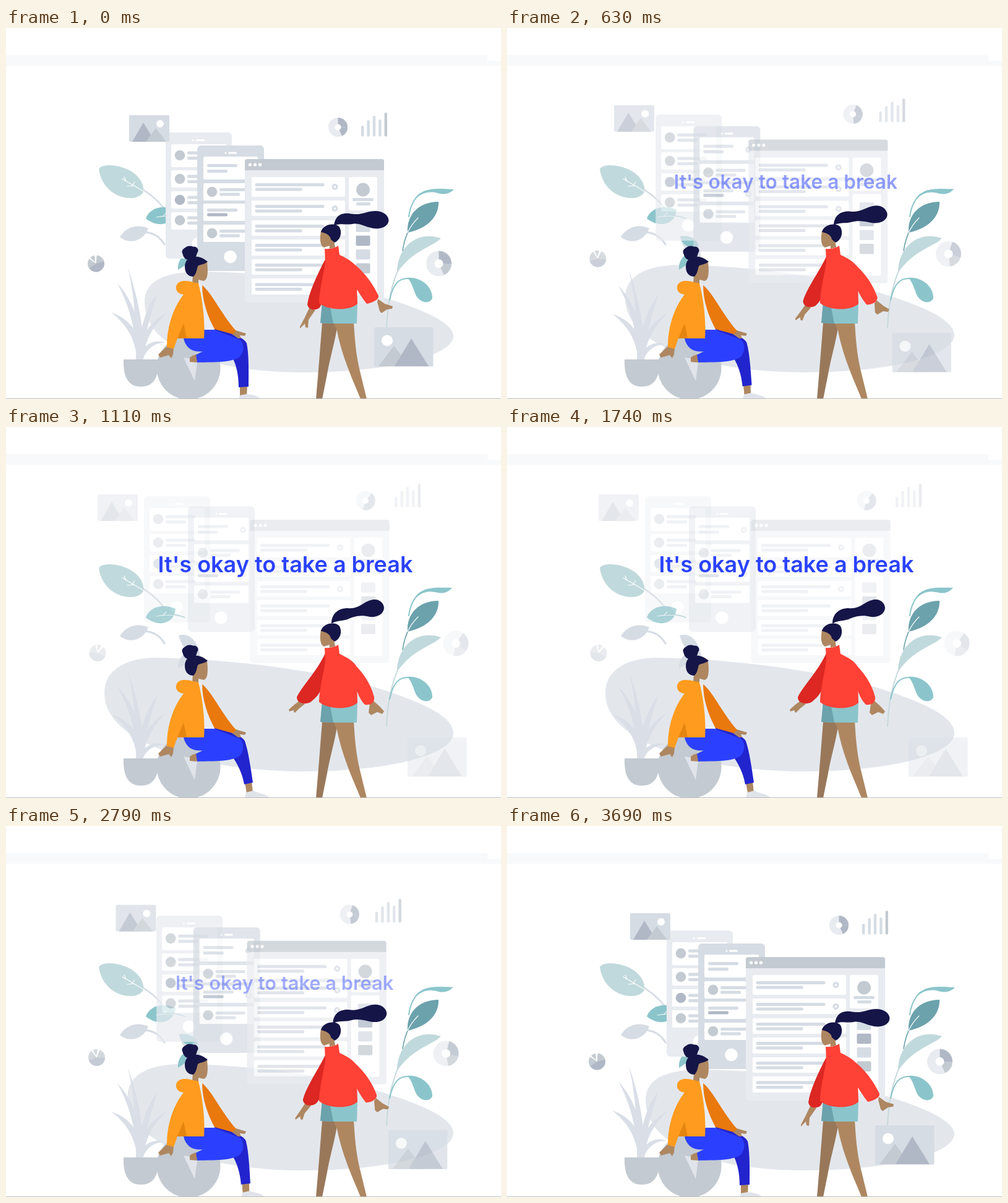
Animation of 800x600 px, one loop 3720 ms. Source, as an HTML page:

```html
<!DOCTYPE html>
<html lang="en">
<head>
<meta charset="utf-8">
<style>
html, body { margin: 0; width: 100%; height: 100%; overflow: hidden; background: #fff; }
svg { display: block; }
text { font: 600 36px Inter, sans-serif; fill: #2a42fc; text-anchor: middle; }
.line { fill: none; stroke-linecap: round; }
</style>
</head>
<body>
<svg id="stage" width="800" height="600" viewBox="0 0 800 600"></svg>
<script>
const PALE = '#e8ebf0', SOFT = '#d6dce4', MID = '#c3cad1', DARK = '#b0b8c6', WHITE = '#fff';
const TEAL = '#8bc5cb', DEEP_TEAL = '#6ba2ac', MIST = '#c0d9dc', NAVY = '#151548';
const SKIN = '#ae8761', SKIN_SHADE = '#99785a', SHOE = '#e0e4ea';

const rect = (x, y, w, h, fill, r = 0) =>
  `<rect x="${x}" y="${y}" width="${w}" height="${h}" rx="${r}" fill="${fill}"/>`;
const dot = (x, y, r, fill) => `<circle cx="${x}" cy="${y}" r="${r}" fill="${fill}"/>`;
const bar = (x, y, w, fill = SOFT) => rect(x, y, w, 5, fill, 2);
const shape = (d, fill) => `<path d="${d}" fill="${fill}"/>`;
const line = (d, stroke, w) => `<path class="line" d="${d}" stroke="${stroke}" stroke-width="${w}"/>`;
const ring = (x, y) => dot(x, y, 5, SOFT) + dot(x, y, 1.8, WHITE);

// A shape with a working pose and a resting pose
const morph = (from, to, fill) => `<path data-from="${from}" data-to="${to}" fill="${fill}"/>`;

// A card that drifts by (dx, dy), optionally turning about its centre
const card = (dx, dy, body, cx = 0, cy = 0, turn = 0) =>
  `<g class="card" data-move="${dx},${dy},${turn},${cx},${cy}">${body}</g>`;

function wedge(cx, cy, r, from, to, fill) {
  const at = deg => {
    const a = (deg - 90) * Math.PI / 180;
    return `${(cx + r * Math.cos(a)).toFixed(2)} ${(cy + r * Math.sin(a)).toFixed(2)}`;
  };
  return shape(`M${cx} ${cy}L${at(from)}A${r} ${r} 0 ${to - from > 180 ? 1 : 0} 1 ${at(to)}Z`, fill);
}

const donut = (cx, cy, r, hole) => dot(cx, cy, r, PALE) + wedge(cx, cy, r, 0, 90, DARK) +
  wedge(cx, cy, r, 90, 155, r > 18 ? MID : DARK) + dot(cx, cy, hole, WHITE);

function phoneBack() {
  let s = rect(258, 169, 107, 204, PALE, 6) + dot(302, 181.5, 1.5, WHITE) + rect(307, 180, 14, 3, WHITE, 1.5);
  [[188, 37, 206], [230, 28, 244], [264, 28, 278], [298, 28, 311]].forEach(([y, h, c], i) => {
    s += rect(267, y, 89, h, WHITE, 2) + dot(281, c, 8.3, i === 2 ? DARK : MID) +
      bar(293, c - 6.5, 48) + bar(293, c + 2, 33);
  });
  return s + dot(310.5, 348.5, 10, WHITE);
}

function phoneFront() {
  let s = rect(309, 190, 108, 203, SOFT, 6) + dot(355, 202, 1.5, WHITE) + rect(359, 200.5, 14, 3, WHITE, 1.5);
  s += rect(319, 208, 88, 37, WHITE, 2) + bar(325, 220, 49) + bar(325, 229, 33) + ring(398, 228);
  s += rect(319, 284, 88, 28, WHITE, 2) + bar(325, 292, 49) + bar(325, 299.5, 33, DARK) + ring(398, 300);
  for (const y of [265, 332])
    s += rect(319, y - 14, 88, 28, WHITE, 2) + dot(333, y, 8.3, MID) + bar(345, y - 6, 48) + bar(345, y + 1.5, 33);
  return s + dot(362.5, 370, 10.3, WHITE);
}

function browser() {
  let s = rect(386, 212, 225, 232, PALE, 4) +
    shape('M386 230V216Q386 212 390 212H607Q611 212 611 216V230Z', MID);
  for (const x of [394.5, 402.5, 410.5]) s += dot(x, 221, 2.6, WHITE);
  [[241, 32, 251], [279, 25, 286], [311, 25, 318], [342, 26, 349], [374, 25, 381], [405, 26, 412.5]]
    .forEach(([y, h, t], i) => {
      s += rect(397, y, 151, h, WHITE, 2) + bar(402.5, t, 112) + bar(402.5, t + 7.5, 76);
      if (i < 3) s += ring(531.5, t + 6);
    });
  s += rect(554, 241, 46, 54, WHITE, 3) + dot(577, 261.5, 11, MID) + bar(560, 275, 34) + bar(566, 282, 23);
  s += rect(554, 300, 46, 132, WHITE, 3);
  [SOFT, DARK, SOFT, MID].forEach((fill, i) => s += rect(565.5, 313.5 + 22.3 * i, 23, 16.5, fill, 2));
  return s;
}

const smallPicture = rect(199, 141, 65, 43, SOFT, 2) + dot(249, 155, 6, WHITE) +
  shape('M204 184L222 153L241 184Z', DARK) + shape('M226 184L242 162L259 184Z', MID);
const bigPicture = rect(595, 484, 95.5, 63.5, SOFT, 2) + dot(616, 505.5, 9, WHITE) +
  shape('M602 547L627 514L652 547Z', MID) + shape('M628 547L655 502L683 547Z', DARK);
const columns = [[574, 158], [583.4, 149], [592.8, 142], [602.2, 148], [611.6, 137]]
  .map(([x, y], i) => rect(x, y, 4.4, 175.5 - y, i === 4 ? MID : SOFT, 2)).join('');
const smallPie = dot(145.5, 381, 13.5, MID) + wedge(145.5, 381, 13.5, 75, 235, DARK) +
  wedge(145.5, 381, 14, 305, 365, WHITE) + wedge(144, 378.5, 10.5, 312, 355, MID);

const backdrop = rect(0, 44, 778, 9, '#f8f9fb') + rect(0, 53, 800, 8, '#f8f9fb') +
  morph('M224 443C224 405 265 393 320 394C430 396 520 408 600 433C680 456 723 478 723 498C723 530 620 557 480 557C340 557 224 520 224 443Z',
    'M159 430C159 395 190 373 245 373C370 376 510 394 600 422C680 447 723 470 723 495C723 530 620 557 480 557C340 557 159 520 159 430Z', '#e3e7ec');

const leftPlant = line('M205 252Q240 270 257 294', SOFT, 2.6) +
  shape('M150 228C158 214 222 224 222.5 264C214 285 157 278 150 228Z', MIST) +
  line('M188 244L222 264M194 248L191 241M204 254L208 249M206 255L196 256', WHITE, 1.2) +
  line('M262 304Q278 303 289 308', '#a9ced2', 1.8) +
  shape('M226 308C232 290 255 285 274 294C272 319 245 324 226 308Z', TEAL) +
  line('M243 306Q258 303 273 305M254 304L259 299', '#e8f3f4', 1.1) +
  line('M212 331Q242 326 256 350', SOFT, 3) +
  shape('M184 338C195 320 215 317 230 324C222 345 200 351 184 338Z', SOFT) +
  shape('M279 337C296 332 311 346 314 372C300 372 285 360 279 337ZM278 391C277 378 284 368 292 366V382Z', SOFT) +
  `<g id="bud">${shape('M280 337C295 335 307 340 310 353C295 357 283 352 280 337ZM278 391C277 378 284 368 292 366V382Z', TEAL)}</g>`;

const rightPlant = line('M615 484C617 440 624 415 634 390', '#c6d9dc', 2) +
  line('M620 440C626 412 636 404 652 405', TEAL, 2) +
  line('M651 305C653 290 658 278 668 269', TEAL, 2) +
  morph('M660 278C672 256 698 260 724 261C714 271 704 269 694 266C680 264 670 268 660 278Z',
    'M660 279C670 257 695 260 721 260C711 271 702 269 693 267C679 264 669 269 660 279Z', TEAL) +
  line('M641 360Q644 340 652 325', DEEP_TEAL, 1.6) +
  shape('M699 281C700 304 682 324 649 331C647 302 667 281 699 281Z', DEEP_TEAL) +
  line('M666 307Q655 318 649 331', WHITE, 1.1) +
  shape('M703 340C692 353 658 358 632 396C632 353 665 327 703 340Z', MIST) +
  shape('M648 404C668 401 690 417 689 437C685 447 670 445 663 433C658 423 656 410 648 404Z', TEAL);

const pot = [
  ['M210 536C211 480 207 430 197 388C210 425 224 480 222 536Z', 'M210 536C211 480 207 435 197 395C209 430 224 480 222 536Z'],
  ['M211 536C210 490 200 450 180 413C205 440 220 480 220 536Z', 'M211 536C210 490 200 455 180 420C204 445 220 480 220 536Z'],
  ['M212 536C208 500 195 480 170 460C200 470 220 495 221 536Z', 'M212 536C208 503 195 484 171 465C200 474 220 498 221 536Z'],
  ['M213 536C214 495 224 455 244 430C234 465 222 500 222 536Z', 'M213 536C214 497 224 460 244 435C234 468 222 502 222 536Z'],
  ['M214 536C217 495 232 475 262 460C238 480 224 505 222 536Z', 'M214 536C217 500 232 478 258 463C238 483 224 507 222 536Z'],
  ['M215 536C220 512 238 502 258 509C240 509 228 518 221 536Z', 'M215 536C220 516 238 508 256 514C240 514 228 521 221 536Z'],
].map(([a, b]) => morph(a, b, '#d9dee7')).join('') +
  dot(295, 549.5, 51.5, MID) + shape('M190 536H246C248 568 236 580 218 580C200 580 189 568 190 536Z', MID);

const sitting =
  shape('M287 533L300 535L309 541L305 571Z', SHOE) +
  morph('M378 578L390 578L389 595L378 595Z', 'M386 575L397 574L399 591L389 592Z', SKIN) +
  morph('M376 600L378 594L389 592C398 593 408 595 412 600Z', 'M386 600L388 591L400 588C408 593 422 593 426 600Z', SHOE) +
  morph('M336 486C360 491 385 500 389 510C393 530 392 560 392 580L376 581C376 560 372 545 366 533Z',
    'M336 486C360 492 382 499 386 508C392 525 396 555 399 575L385 578C382 560 374 545 366 533Z', '#2224ce') +
  shape('M287 502H320V488H336L378 504C386 511 385 526 376 533C360 542 330 540 309 541L306 529L318 523C300 525 290 516 287 502Z', '#2b40ff') +
  shape('M301 530L307 528L309 541L297 540L297 533Z', SKIN) +
  shape('M260 515L271 518L270 528L267 534L263 529L249 533L246 528Z', SKIN) +
  shape('M368 488L388 494L386 498L378 497L380 502L375 502L365 495Z', SKIN) +
  shape('M309 411L318 416C324 445 332 470 337 488H319C322 470 318 440 309 411Z', '#e9ecf1') +
  shape('M317 416C334 430 346 460 372 490L366 495L337 487C325 465 317 440 317 416Z', '#e9780d') +
  shape('M303 384L325 379C327 395 326 409 319 409L311 407L311 413H301Z', SKIN) +
  shape('M275 418C277 407 292 408 302 411L311 413C318 440 322 475 320 502H277L271 519L260 516C260 480 272 450 287 431C278 430 274 425 275 418Z', '#ff9b1e') +
  shape('M277 502L287 478L292 502Z', '#e4850f') +
  shape('M289 386C289 369 309 363 326 378C320 383 314 382 310 385C308 391 308 397 303 402C294 402 289 396 289 386Z', NAVY) +
  dot(297, 364, 11.5, NAVY) + dot(291, 362, 6.5, NAVY) + dot(304, 360, 6.5, NAVY);

const standing =
  morph('M490 453L500 456L489 472L488 485L484 484L483 478L475 486L475 483L482 470Z',
    'M474 443L483 448L474 455L467 462L465 461L465 458L458 460L457 457L466 449Z', SKIN) +
  morph('M516 374C505 395 490 425 487 447C489 457 500 457 506 453C512 447 514 430 517 400Z',
    'M516 366C502 396 477 421 470 437C470 448 485 449 492 445C505 435 512 425 517 400Z', '#dc2722') +
  shape('M511 476H536C534 500 523 535 519 560L511 600H501L506 540Z', SKIN_SHADE) +
  shape('M529 476H562C564 505 565 525 572 555L583 600H573C561 570 544 535 535 490Z', SKIN) +
  shape('M511 444H568L567 478H529L508 477Z', TEAL) + shape('M511 444L523 447L529 478L508 477Z', DEEP_TEAL) +
  morph('M601 438L612 446L625 450L624 454L616 455L607 461L604 458L600 443Z',
    'M594 443L604 452L611 460L608 464L600 461L590 466L586 462L588 447Z', SKIN) +
  morph('M539 367C568 380 590 407 602 433C603 440 590 445 583 446C575 436 570 427 564 418L545 380Z',
    'M539 367C566 380 589 410 595 437C596 447 588 450 580 449C573 442 569 432 564 420L545 380Z', '#ff4136') +
  shape('M522 345L530 343L532 355L523 357Z', SKIN) +
  shape('M515 357C525 358 533 355 537 352L539 367C552 373 560 378 566 386L568 446C555 458 522 457 506 445C506 425 514 395 516 378Z', '#ff4136') +
  shape('M509 328C518 328 527 333 528 343L523 352L514 355C507 352 507 340 509 328Z', SKIN) +
  shape('M509 330C512 317 532 314 539 322C544 332 540 343 531 347L525 342C524 335 518 332 509 330Z', NAVY) +
  morph('M530 320C532 303 542 299 555 300C575 304 582 296 597 296C610 296 618 303 618.5 311C618 321 606 326 593 324C578 321 572 315 560 317C550 319 540 315 530 320Z',
    'M526 318C526 301 538 293 552 293C572 295 578 281 594 279C606 278 611 287 611 293C610 303 600 308 588 307C572 303 562 307 552 311C542 314 533 313 526 318Z', NAVY);

const stage = document.getElementById('stage');
stage.innerHTML = backdrop + leftPlant + rightPlant +
  card(-35, -57, phoneBack()) + card(-15, -61.5, phoneFront()) + card(8.5, -62, browser()) +
  card(-51, -32, smallPicture) + card(54, 18, bigPicture) + card(54, -45.5, columns) +
  card(44.5, -41.5, donut(536.5, 160.5, 15.6, 5), 536.5, 160.5, 40) +
  card(27.5, -31, donut(699.5, 381, 20.5, 7), 699.5, 381, 35) +
  card(2.5, -15.5, smallPie, 145.5, 381, 40) +
  '<text id="message" y="13">It\'s okay to take a break</text>' +
  pot + sitting + standing + rect(0, 599, 800, 1, '#bcc0c4');

const NUMBER = /-?\d+(\.\d+)?/g;
const morphs = [...stage.querySelectorAll('[data-from]')].map(el => ({
  el, from: el.dataset.from, to: el.dataset.to.match(NUMBER).map(Number),
}));
const cards = [...stage.querySelectorAll('.card')].map(el => ({ el, move: el.dataset.move.split(',').map(Number) }));
const message = document.getElementById('message'), bud = document.getElementById('bud');

const clamp = v => Math.min(1, Math.max(0, v));

// cubic-bezier(a, 0, b, 1)
function ease(u, a, b) {
  let lo = 0, hi = 1;
  for (let i = 0; i < 20; i++) {
    const s = (lo + hi) / 2, r = 1 - s;
    if (3 * a * r * r * s + 3 * b * r * s * s + s ** 3 < u) lo = s; else hi = s;
  }
  return lo * lo * (3 - 2 * lo);
}

const LOOP = 3720;
const restAt = t => t < 2425
  ? ease(clamp((t - 461) / 646), 0.3, 0.06)
  : 1 - ease(clamp((t - 2425) / 911), 0.58, 0.1);

function draw(t) {
  const p = restAt(t);
  for (const { el, from, to } of morphs) {
    let i = 0;
    el.setAttribute('d', from.replace(NUMBER, n => (+n + (to[i++] - n) * p).toFixed(2)));
  }
  for (const { el, move: [dx, dy, turn, cx, cy] } of cards) {
    el.setAttribute('transform', `translate(${dx * p} ${dy * p}) rotate(${turn * p} ${cx} ${cy})`);
    el.setAttribute('opacity', 1 - 0.66 * p);
  }
  bud.setAttribute('opacity', clamp((0.85 - p) / 0.3));
  message.setAttribute('transform', `translate(${449 + 2.5 * p} ${277 - 55 * p}) scale(${0.752 + 0.248 * p})`);
  message.setAttribute('opacity', p);
}

const start = performance.now();
function tick() {
  draw((performance.now() - start) % LOOP);
  requestAnimationFrame(tick);
}
tick();
</script>
</body>
</html>
```
